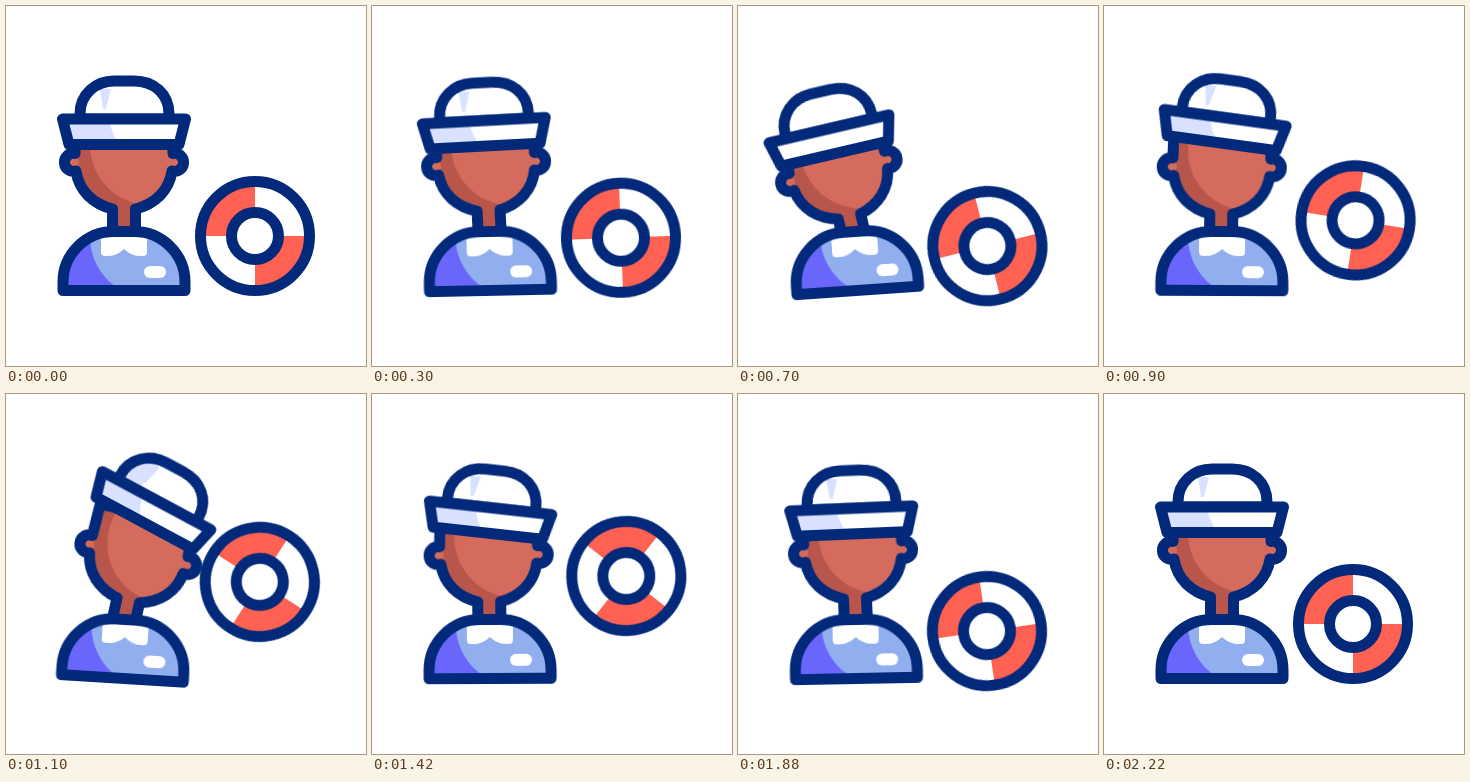
Write an HTML page without scripts that moves like this. It is 360 px wide and 360 px high and loops after 2.4 s.

```html
<!DOCTYPE html>
<html lang="en">
<head>
<meta charset="utf-8">
<title>Sailor and lifebuoy</title>
<style>
  html, body { margin: 0; width: 100%; height: 100%; overflow: hidden; background: #fff; }
  svg { display: block; width: 100%; height: 100%; }

  .line { fill: none; stroke: #02297a; stroke-width: 11; stroke-linejoin: round; stroke-linecap: round; }
  .white { fill: #fff; }
  .shade { fill: #d8e1ff; }

  .head, .hat, .body, .ring { animation: 2400ms cubic-bezier(.37, 0, .63, 1) infinite; }
  .head { animation-name: nod; transform-origin: 118px 212px; }
  .body { animation-name: sway; transform-origin: 118px 258px; }
  .hat { animation-name: tip; transform-origin: 118px 125px; }
  .ring { animation-name: bounce; transform-origin: 0 0; }
  .soft { animation: soft 2400ms step-end infinite; }
  .deep { animation: deep 2400ms step-end infinite; }

  @keyframes nod {
    0%, 7.1% { transform: translate(0, 0) rotate(0deg); }
    25.42% { transform: translate(-5px, 7.5px) rotate(-15deg); }
    48% { transform: translate(2.5px, 3px) rotate(13deg); }
    68.33% { transform: translate(-3px, 6px) rotate(-10.5deg); }
    83%, 100% { transform: translate(0, 0) rotate(0deg); }
  }
  @keyframes sway {
    0%, 5.83% { transform: rotate(0deg); }
    25.42% { transform: rotate(-4.5deg); }
    47.08% { transform: rotate(3.6deg); }
    67.92% { transform: rotate(-2.6deg); }
    87.5%, 100% { transform: rotate(0deg); }
  }
  @keyframes tip {
    0%, 29.17% { transform: translate(0, 0) rotate(0deg); }
    47.08% { transform: translate(3px, -14px) rotate(16deg); animation-timing-function: cubic-bezier(.45, 0, .75, .75); }
    59.17% { transform: translate(1px, -4px) rotate(7deg); animation-timing-function: cubic-bezier(.25, .25, .55, 1); }
    67.92%, 100% { transform: translate(0, 0) rotate(0deg); }
  }
  @keyframes bounce {
    0%, 9.17% { transform: translate(0, 0) rotate(0deg); }
    24.3% { transform: translate(0, 15px) rotate(-18.5deg); }
    51.25%, 59.17% { transform: translate(5.3px, -48px) rotate(38deg); }
    76.67% { transform: translate(0, 7.3px) rotate(-8.5deg); }
    91.67%, 100% { transform: translate(0, 0) rotate(0deg); }
  }
  @keyframes soft {
    0%, 36% { opacity: 1; }
    18% { opacity: 0; }
  }
  @keyframes deep {
    0%, 56% { opacity: 0; }
    40% { opacity: 1; }
  }
</style>
</head>
<body>
<svg viewBox="0 0 360 360">
  <defs>
    <path id="face" d="M70 115 69 147.500a9 9 0 1 0 1 17.500C73 185 87 198 106.500 203V226H129.500V203C149 198 163 185 166 165a9 9 0 1 0 1-17.500L166 115Z"/>
    <path id="torso" d="M57 284.500V276A51 50.500 0 0 1 108 225.500H128A51 50.500 0 0 1 179 276V284.500Z"/>
    <path id="dome" d="M74 113V108C74 88 90 75 108 75H128C148 75 163 88 163 108V113Z"/>
    <path id="brim" d="M56.500 113H179.500L173 138.500H63Z"/>
    <path id="quarter" d="M0 0V-54A54 54 0 0 0-54 0Z"/>
    <clipPath id="inFace"><use href="#face"/></clipPath>
    <clipPath id="inTorso"><use href="#torso"/></clipPath>
    <clipPath id="inDome"><use href="#dome"/></clipPath>
    <clipPath id="inBrim"><use href="#brim"/></clipPath>
  </defs>

  <g transform="translate(249 230)">
    <g class="ring">
      <circle class="white" r="54.500"/>
      <g fill="#ff6153">
        <use href="#quarter"/>
        <use href="#quarter" transform="rotate(180)"/>
      </g>
      <circle class="line" r="54.500"/>
      <circle class="white" r="23.500"/>
      <circle class="line" r="23.500"/>
    </g>
  </g>

  <g class="head">
    <use href="#face" fill="#b8564b"/>
    <g clip-path="url(#inFace)" fill="#d56b5c">
      <circle cx="144" cy="139" r="60"/>
      <circle cx="66" cy="156" r="7"/>
    </g>
    <use href="#face" class="line"/>
    <g class="hat">
      <use href="#dome" class="white"/>
      <g clip-path="url(#inDome)" class="shade">
        <path class="soft" d="M94 83H105L100 103H97Z"/>
        <path class="deep" d="M70 70H108Q99 88 97 113H70Z"/>
      </g>
      <use href="#dome" class="line"/>
      <use href="#brim" class="white"/>
      <g clip-path="url(#inBrim)" class="shade">
        <path class="soft" d="M56 113H103Q105 127 114 139H56Z"/>
      </g>
      <use href="#brim" class="line"/>
    </g>
  </g>

  <g class="body">
    <use href="#torso" fill="#6b66fb"/>
    <g clip-path="url(#inTorso)">
      <circle cx="145" cy="231" r="61" fill="#91afef"/>
    </g>
    <path class="white" d="M95 230H141V246Q141 250 137 250Q126 251 118 243Q110 251 99 250Q95 250 95 246Z"/>
    <rect class="white" x="138" y="260" width="22" height="12" rx="6"/>
    <use href="#torso" class="line"/>
  </g>
</svg>
</body>
</html>
```
